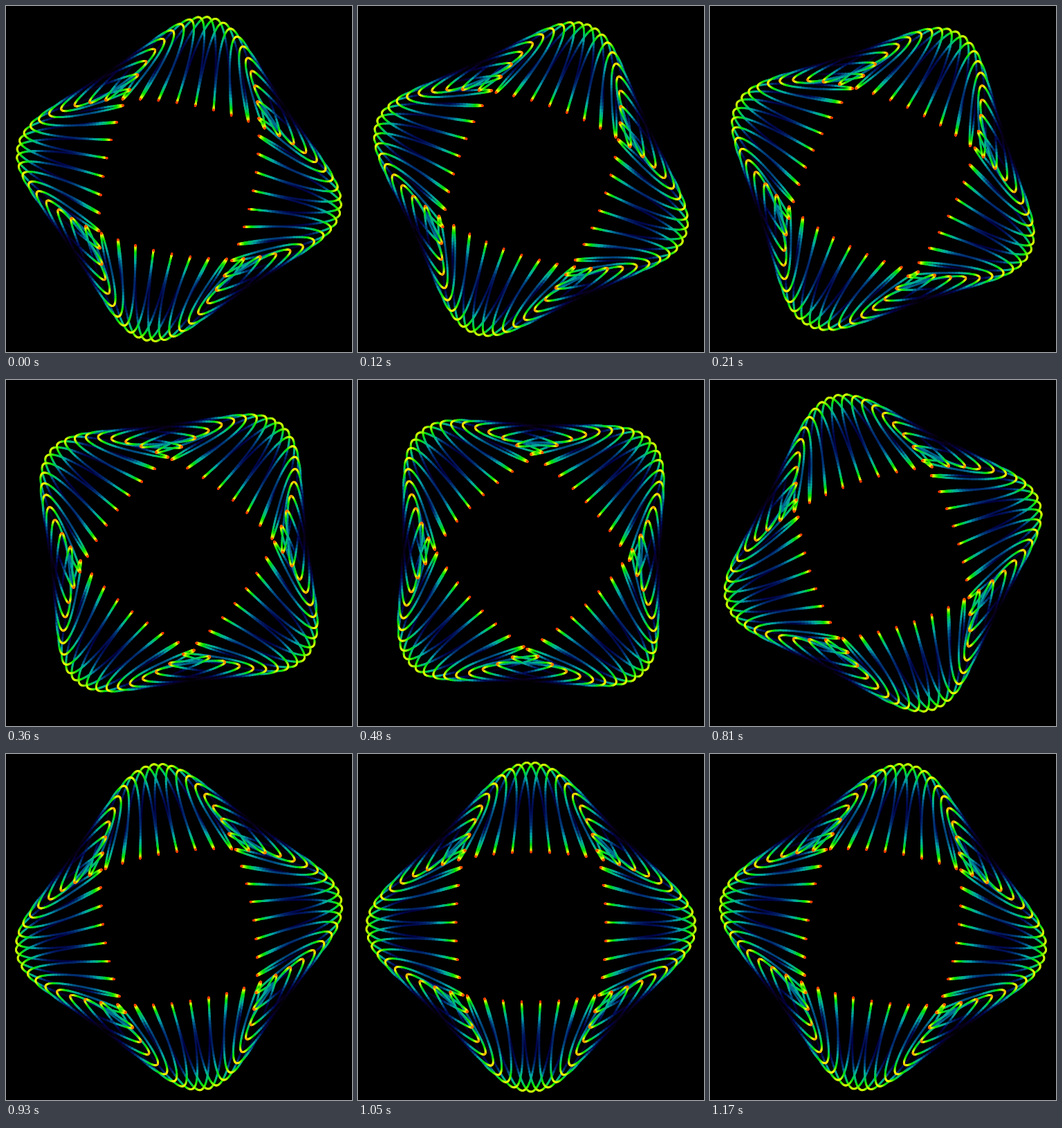
Recreate the animation shown at these times as an HTML page with a canvas. Size 500 by 500 pixels, loop 1200 ms.

```html
<!DOCTYPE html>
<html lang="en">
<head>
<meta charset="utf-8">
<title>Rotating epicycle curve</title>
<style>
  html, body { margin: 0; width: 100%; height: 100%; overflow: hidden; background: #000; }
  canvas { display: block; width: 500px; height: 500px; }
</style>
</head>
<body>
<canvas id="stage" width="500" height="500"></canvas>
<script>
const ctx = document.getElementById('stage').getContext('2d');
const TAU = Math.PI * 2;
const LOOP = 1200, STEP = 30;
const SAMPLES = 55 * 72;
const SHADES = 128;

// Each wheel: radius, turns along the curve, phase at rest, turns per loop
const wheels = [
  { r: 173, k: 3,   phase: 0,     turns: 0 },
  { r: 39,  k: 52,  phase: -0.25, turns: -1 },
  { r: 26,  k: -58, phase: 0.25,  turns: 0 }
];
const maxSpeed = wheels.reduce((sum, w) => sum + w.r * Math.abs(w.k), 0);

// Colour by relative speed: slow is red, fast fades through violet to black
const shade = s => `hsl(${270 * s}, 100%, ${50 * (1 - s ** 2.5)}%)`;
const palette = Array.from({ length: SHADES }, (_, i) => shade(i / (SHADES - 1)));

function pointAt(q, u) {
  let x = 0, y = 0, vx = 0, vy = 0;
  for (const w of wheels) {
    const angle = TAU * (w.k * q + w.phase + w.turns * u);
    const c = w.r * Math.cos(angle), s = w.r * Math.sin(angle);
    x += c;
    y += s;
    vx -= w.k * s;
    vy += w.k * c;
  }
  return { x: 250 + x, y: 250 - y, speed: Math.hypot(vx, vy) / maxSpeed };
}

function draw(ms) {
  const u = (ms - 1050) / LOOP;
  const paths = palette.map(() => new Path2D());
  let p = pointAt(0, u);
  for (let i = 1; i <= SAMPLES; i++) {
    const n = pointAt(i / SAMPLES, u);
    const s = Math.min(1, (p.speed + n.speed) / 2);
    const path = paths[Math.round(s * (SHADES - 1))];
    path.moveTo(p.x, p.y);
    path.lineTo(n.x, n.y);
    p = n;
  }
  ctx.fillStyle = '#000';
  ctx.fillRect(0, 0, 500, 500);
  ctx.lineWidth = 3;
  ctx.lineCap = 'round';
  // Dark strands first, bright ones on top
  for (let i = SHADES - 1; i >= 0; i--) {
    ctx.strokeStyle = palette[i];
    ctx.stroke(paths[i]);
  }
}

let start = null, shown = -1;
function tick(now) {
  if (start === null) start = now;
  const ms = Math.floor(((now - start) % LOOP) / STEP) * STEP;
  if (ms !== shown) draw(shown = ms);
  requestAnimationFrame(tick);
}
draw(0);
requestAnimationFrame(tick);
</script>
</body>
</html>
```
